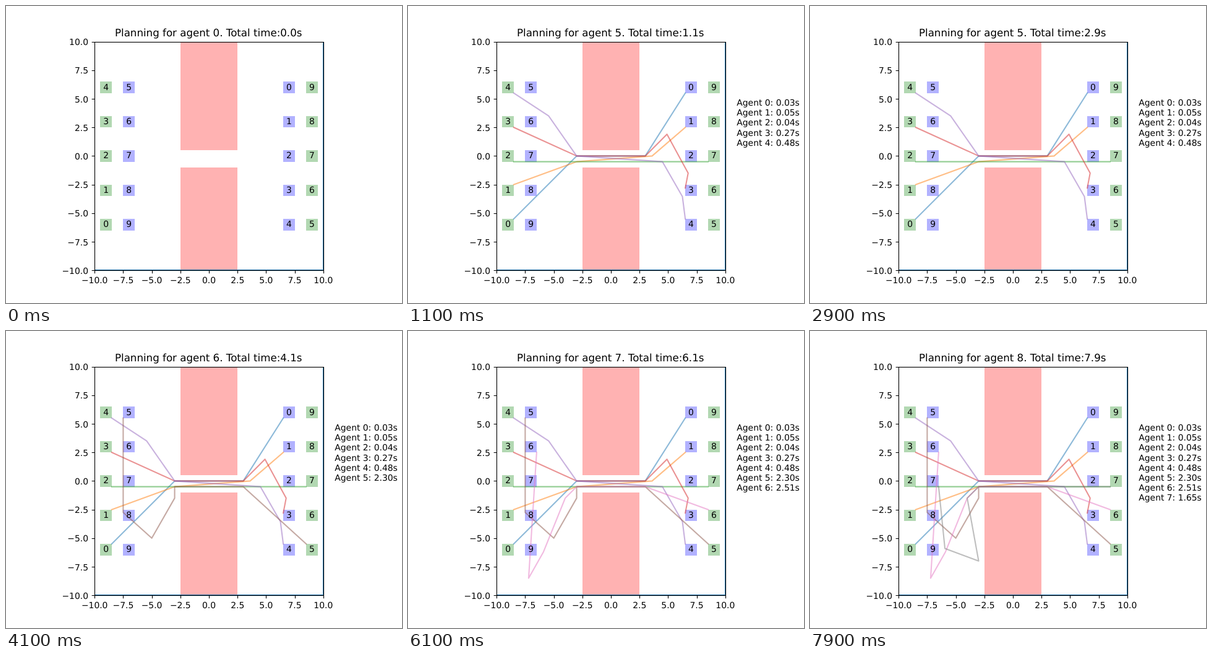
An HTML page that plays this animation: 640 px wide and 480 px high, repeating every 8 s.

```html
<!DOCTYPE html>
<html lang="en">
<head>
<meta charset="utf-8">
<title>Agent planning</title>
<style>
  html, body { margin: 0; width: 100%; height: 100%; overflow: hidden; background: #fff; }
  svg { display: block; width: 640px; height: 480px; }
  text {
    font: 13.889px "DejaVu Sans", sans-serif;
    text-rendering: geometricPrecision;
    white-space: pre;
  }
  .title { font-size: 16.667px; }
  .mid { text-anchor: middle; }
  .end { text-anchor: end; }
  .axis { fill: none; stroke: #000; stroke-width: 1.11; }
  .route {
    fill: none; stroke-width: 2.083; stroke-opacity: .5;
    stroke-linecap: square; stroke-linejoin: round;
  }
</style>
</head>
<body>
<svg id="stage" viewBox="0 0 640 480"></svg>
<script>
const LOOP = 8000, STEP = 100;
const UNIT = 18.48;
const RED = '#ffb2b2', GREEN = '#b2d8b2', BLUE = '#b2b2ff';
const px = x => 328 + x * UNIT;
const py = y => 242.4 - y * UNIT;
const stage = document.getElementById('stage');

// Five rows of cells; agents 0-4 cross to the left, 5-9 to the right.
const startOf = i => [i < 5 ? 7 : -7, 6 - 3 * (i % 5)];
const goalOf = i => [i < 5 ? -9 : 9, 3 * (i % 5) - 6];

// Corner of a cell that faces the passage.
const corner = ([x, y]) => [x - Math.sign(x) / 2, y - (Math.sign(y) || 1) / 2];

// Passage mouths, and a shared turning point before them.
const east = [3, 0], west = [-3, 0];
const eastLow = [3, -.5], westLow = [-3, -.5];
const turn = [-4, -1.5];

// Cost is in hundredths of a second; via holds the bends between start and goal.
const agents = [
  { cost: 3, color: '#1f77b4', via: [east, west] },
  { cost: 5, color: '#ff7f0e', via: [[3.6, 0], westLow] },
  { cost: 4, color: '#2ca02c', via: [[8.5, -.5]] },
  { cost: 27, color: '#d62728', start: [6.5, -2.8], via: [[6.75, -1.5], [4.9, 1.9], east, west] },
  { cost: 48, color: '#9467bd', via: [[6.25, -3.55], [4.5, -.5], west, [-5.45, 3.5]] },
  { cost: 230, color: '#8c564b', start: [-7.5, 5.5], via: [[-7.5, -2.75], [-5, -5], [-3, -1.5], westLow, eastLow] },
  { cost: 251, color: '#e377c2', via: [[-7.2, -8.5], [-5.9, -6.2], turn, westLow, eastLow] },
  { cost: 165, color: '#7f7f7f', via: [[-5.95, -5.9], [-3, -7], turn, westLow, eastLow] }
];

function add(tag, attrs, content = '') {
  const node = document.createElementNS('http://www.w3.org/2000/svg', tag);
  for (const key in attrs) node.setAttribute(key, attrs[key]);
  node.textContent = content;
  return stage.appendChild(node);
}

function box(left, bottom, right, top, fill) {
  const x = Math.round(px(left)), y = Math.round(py(top));
  add('rect', {
    x, y, fill,
    width: Math.round(px(right)) - x,
    height: Math.round(py(bottom)) - y
  });
}

const label = (x, y, content, cls = '') =>
  add('text', { x, y: Math.round(y), class: cls }, content);

// Obstacles
box(-2.5, .5, 2.5, 10, RED);
box(-2.5, -10, 2.5, -1, RED);

// Start and goal cells
const cells = [];
for (let i = 0; i < 10; i++)
  cells.push([...startOf(i), i, BLUE], [...goalOf(i), i, GREEN]);
for (const [x, y, , fill] of cells) box(x - .5, y - .5, x + .5, y + .5, fill);

// Room edge, half hidden by the frame
add('path', { d: 'M143 426.5H512.5V58', fill: 'none', stroke: '#1f77b4' });

const routes = agents.map(({ color, start, via }, i) => {
  const points = [start || corner(startOf(i)), ...via, corner(goalOf(i))];
  const d = 'M' + points.map(([x, y]) => `${px(x)} ${py(y)}`).join('L');
  return add('path', { class: 'route', stroke: color, d });
});

// Frame and ticks
add('rect', { class: 'axis', x: 143.5, y: 58.5, width: 370, height: 369 });
for (let v = -10; v <= 10; v += 2.5) {
  const name = v.toFixed(1).replace('-', '\u2212');
  const x = Math.round(px(v)) + .5, y = Math.round(py(v)) + .5;
  add('path', { class: 'axis', d: `M${x} 427.5v4.86M143.5 ${y}h-4.86` });
  label(px(v), 448, name, 'mid');
  label(133, py(v) + 5.5, name, 'end');
}

for (const [x, y, id] of cells) label(px(x), py(y) + 4, id, 'mid');

const title = label(327.2, 49, '', 'title mid');
const lines = agents.map(({ cost }, i) =>
  label(531.3, 161 + i * 16.2, `Agent ${i}: ${(cost / 100).toFixed(2)}s`));

let sum = 0;
const doneAt = agents.map(({ cost }) => sum += cost);

function draw() {
  const tick = Math.floor(performance.now() % LOOP / STEP);
  const done = doneAt.filter(t => t <= tick * 10).length;
  title.textContent = `Planning for agent ${done}. Total time:${(tick / 10).toFixed(1)}s`;
  for (const group of [routes, lines])
    group.forEach((node, i) => node.setAttribute('visibility', i < done ? 'visible' : 'hidden'));
  requestAnimationFrame(draw);
}
draw();
</script>
</body>
</html>
```
